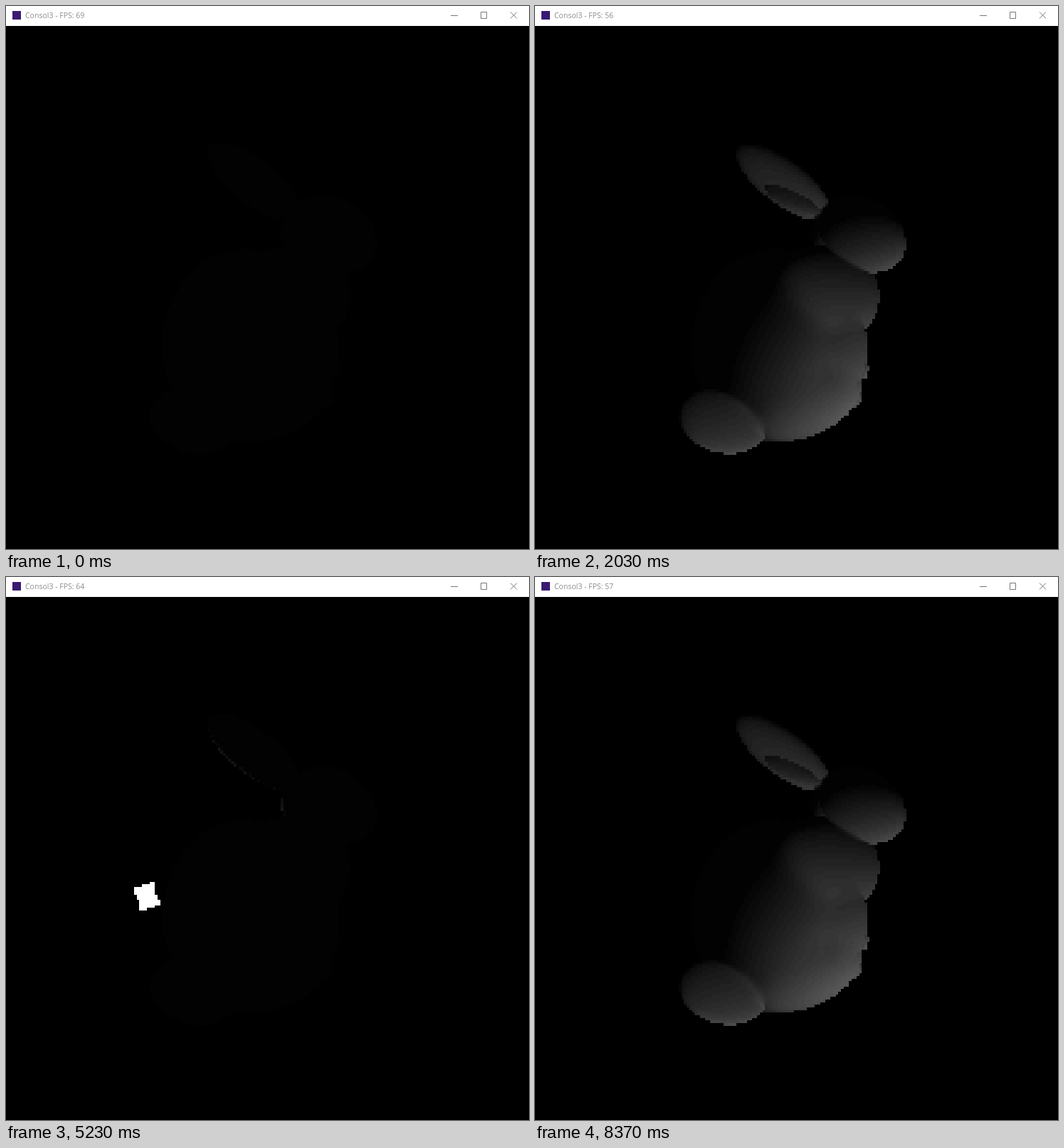
Animation of 735x762 px, one loop 8410 ms. Source, as an HTML page with a canvas:

```html
<!DOCTYPE html>
<html lang="en">
<head>
<meta charset="utf-8">
<title>Consol3</title>
<style>
  html, body { margin: 0; width: 100%; height: 100%; overflow: hidden; background: #000; }
  #bar { position: absolute; z-index: 1; left: 0; top: 0; width: 735px; height: 28px; background: #fff; }
  #icon { position: absolute; left: 9px; top: 7px; width: 12px; height: 12px; background: #3a1a72; }
  #title { position: absolute; left: 27px; top: 6px; font: 10.5px/15px "Open Sans", "Noto Sans", sans-serif; color: #8c8c8c; white-space: pre; }
  #bar svg { position: absolute; left: 0; top: 0; }
  #view { position: absolute; left: 0; top: 27px; width: 735px; height: 735px; }
</style>
</head>
<body>
<div id="bar">
  <div id="icon"></div>
  <div id="title"></div>
  <svg width="735" height="28" fill="none" stroke="#777" stroke-width="1">
    <path d="M625 13.5h10M667.5 8.5h8v9h-8zM709 8.5l9 9M718 8.5l-9 9"/>
  </svg>
</div>
<canvas id="view" width="735" height="735"></canvas>
<script>
const LOOP = 8410, SIZE = 735, N = 200, CELL = SIZE / N, TOP = 27;
const MID_X = 367, MID_Y = 394;
const AMBIENT = 2, GAIN = 85, STEP = 4;

const view = document.getElementById('view').getContext('2d');
const title = document.getElementById('title');
const grid = document.createElement('canvas');
grid.width = grid.height = N;
const pen = grid.getContext('2d');
const image = pen.createImageData(N, N);

// one reading per second
const FPS = [69, 70, 56, 43, 45, 64, 77, 77, 57];

// an ellipsoid; tilt leans its visible side right (x) and down (y)
function part(x, y, z, rx, ry, deg = 0, tilt = [0, 0]) {
  const a = deg * Math.PI / 180;
  return { x, y, z, rx, ry, rz: 0.62 * Math.min(rx, ry), co: Math.cos(a), si: Math.sin(a), tilt };
}

const RABBIT = {
  body: part(338, 477, 60, 118, 136),
  chest: part(400, 408, 80, 84, 72, 0, [1.2, -0.3]),
  arm: part(432, 480, 94, 35, 62, 0, [0.8, -0.2]),
  foot: part(378, 554, 90, 84, 50, -22, [0.4, 0]),
  paw: part(457, 508, 60, 12, 18),
  toe: part(445, 549, 60, 14, 16),
  tail: part(264, 582, 90, 63, 45, 15, [1.4, -1.5]),
  head: part(460, 320, 85, 65, 50, 33),
  neck: part(420, 318, 70, 33, 42),
  ear: part(348, 246, 70, 80, 31, 38, [0.2, 0.3]),
  lobe: part(362, 272, 84, 42, 12, 25)
};

// height and normal of a part at a stage point, or null beside it
function probe(p, x, y) {
  const dx = x - p.x, dy = y - p.y;
  const u = (dx * p.co + dy * p.si) / p.rx, v = (dy * p.co - dx * p.si) / p.ry;
  const q = 1 - u * u - v * v;
  if (q <= 0) return null;
  const nu = u / p.rx, nv = v / p.ry, nz = Math.sqrt(q + 0.08) / p.rz;
  return {
    z: p.z + p.rz * Math.sqrt(q),
    n: unit([
      nu * p.co - nv * p.si + p.tilt[0] * nz,
      nu * p.si + nv * p.co + p.tilt[1] * nz,
      nz
    ])
  };
}

function unit(v) {
  const len = Math.hypot(...v);
  return v.map(c => c / len);
}

// front surface of the rabbit in one cell, with soft seams between parts
function surfaceAt(k) {
  const x = (k % N + 0.5) * CELL, y = TOP + (Math.floor(k / N) + 0.5) * CELL;
  const hits = Object.values(RABBIT).map(p => probe(p, x, y)).filter(Boolean);
  if (!hits.length) return null;
  const z = Math.max(...hits.map(h => h.z)), n = [0, 0, 0];
  for (const h of hits) {
    const weight = Math.exp((h.z - z) / 5);
    h.n.forEach((c, i) => n[i] += weight * c);
  }
  return { x: x - MID_X, y: y - MID_Y, z, n: unit(n) };
}

const surface = Array.from({ length: N * N }, (_, k) => surfaceAt(k));

// the lamp circles the rabbit once every 2π seconds on a tilted orbit
function lampAt(t) {
  const a = t / 1000 + 0.25, s = Math.sin(a), c = Math.cos(a);
  return { s, c, x: 391 * s, y: 208.5 - 143 * c + 26.4 * s, z: -364 * c, depth: 1 + 0.95 * c };
}

function shade(p, lamp) {
  const dx = lamp.x - p.x, dy = lamp.y - p.y, dz = lamp.z - p.z;
  const d = Math.hypot(dx, dy, dz);
  const facing = Math.max(0, (p.n[0] * dx + p.n[1] * dy + p.n[2] * dz) / d);
  return AMBIENT + Math.round(GAIN * facing * Math.sqrt(300 / d) / STEP) * STEP;
}

// outline of the lamp cube, walked along its three projected edges and back
function cubePath(lamp, cx, cy) {
  const side = Math.sign(lamp.s), path = new Path2D();
  const edges = [[50, 17 * side], [-3 * side, 28], [-12 * side, 26]]
    .map(e => e.map(c => c / lamp.depth));
  let x = cx, y = cy;
  for (const [ex, ey] of edges) { x -= ex / 2; y -= ey / 2; }
  path.moveTo(x, y);
  for (const sign of [1, -1]) for (const [ex, ey] of edges) {
    x += sign * ex;
    y += sign * ey;
    path.lineTo(x, y);
  }
  return path;
}

function drawCube(lamp, put) {
  if (lamp.c < -0.25) return;
  const cx = MID_X + lamp.x / lamp.depth, cy = MID_Y + lamp.y / lamp.depth;
  const path = cubePath(lamp, cx, cy), reach = 60;
  const cell = v => Math.min(N, Math.max(0, Math.floor(v / CELL)));
  for (let j = cell(cy - TOP - reach); j < cell(cy - TOP + reach); j++)
    for (let i = cell(cx - reach); i < cell(cx + reach); i++)
      if (!surface[j * N + i] && pen.isPointInPath(path, (i + 0.5) * CELL, TOP + (j + 0.5) * CELL))
        put(j * N + i, 255);
}

function draw(t) {
  const lamp = lampAt(t), px = image.data;
  const put = (k, v) => {
    px[4 * k] = px[4 * k + 1] = px[4 * k + 2] = v;
    px[4 * k + 3] = 255;
  };
  surface.forEach((p, k) => put(k, p ? shade(p, lamp) : 0));
  drawCube(lamp, put);
  pen.putImageData(image, 0, 0);
  view.imageSmoothingEnabled = false;
  view.drawImage(grid, 0, 0, SIZE, SIZE);
  title.textContent = 'Consol3 - FPS: ' + FPS[Math.floor((t + 150) / 1000)];
}

const start = performance.now();
function tick() {
  draw((performance.now() - start) % LOOP);
  requestAnimationFrame(tick);
}
tick();
</script>
</body>
</html>
```
